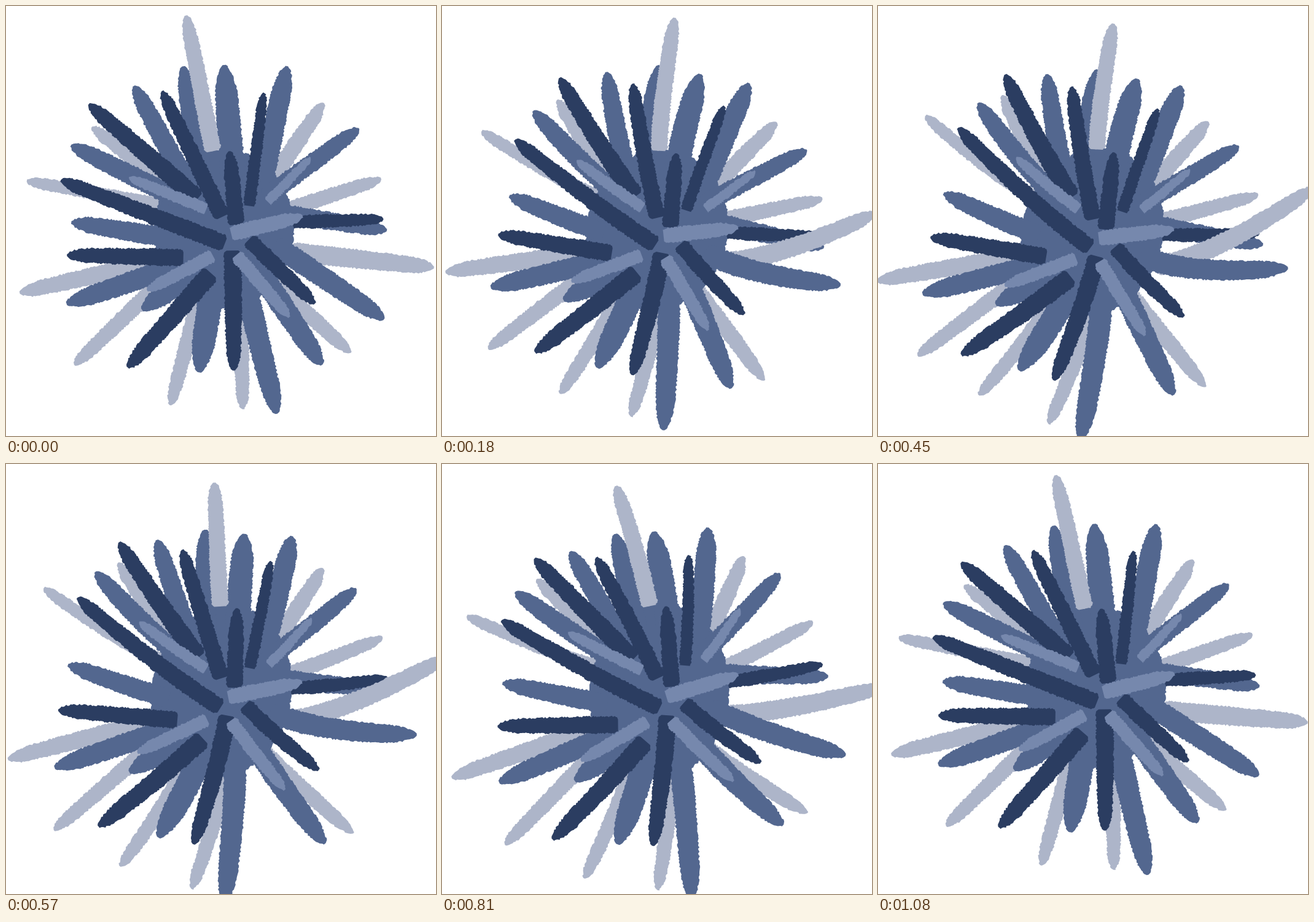
Write an HTML page with a canvas that moves like this. It is 700 px wide and 700 px high and loops after 1110 ms.

```html
<!DOCTYPE html>
<html lang="en">
<head>
<meta charset="utf-8">
<title>Swaying brush burst</title>
<style>
html, body { margin: 0; width: 100%; height: 100%; overflow: hidden; background: #fff; }
canvas { display: block; }
</style>
</head>
<body>
<canvas id="stage" width="700" height="700"></canvas>
<script>
const ctx = document.getElementById('stage').getContext('2d');
const LOOP = 1110, STEP = 30, CX = 355, CY = 365;
const LIGHT = '#adb5c9', MID = '#53678f', DARK = '#2b3d61', GLOW = '#7688ad';

// Each brush stroke: tip angle, reach, root angle, width, and root radius where it is not the layer's
const layers = [
  { color: LIGHT, root: 100, strokes: [
    [308,263,315,27], [342,269,342,24], [44,287,48,26], [84,293,75,25], [107,298,111,25],
    [138,328,142,26], [163,348,153,29], [194,331,203,22], [218,273,219,25]] },
  { color: MID, root: 90, strokes: [[0,265,341,29]] },
  { color: DARK, root: 106, strokes: [[356,260,353,21]] },
  { color: LIGHT, root: 115, strokes: [[10,347,18,31]] },
  { color: MID, body: true },
  { color: MID, root: 85, strokes: [
    [238,277,230,32], [256,275,246,34], [270,269,280,40], [291,286,313,36], [323,275,321,29],
    [29,298,16,34], [54,271,49,36], [74,311,68,36], [100,235,102,40], [136,186,125,36],
    [155,283,140,34], [183,249,171,31], [209,285,215,32]] },
  { color: LIGHT, root: 130, strokes: [[260,355,262,27]] },
  { color: DARK, root: 22, strokes: [
    [246,248,262,26], [274,129,336,26], [286,233,316,19,57], [39,190,21,25,43], [86,229,67,28,36],
    [125,273,107,30,73], [171,259,146,27,80], [197,278,87,27], [223,301,230,29,67]] },
  { color: GLOW, root: 45, strokes: [
    [350,130,27,24,13], [320,184,327,15,85], [209,177,230,18], [142,159,114,21], [53,177,64,21]] }
];

// How far tips turn by direction: degrees, radians at full swing, radians when trailing
const bends = [
  [0,.17,-.05], [10,-.42,-.25], [29,-.35,-.22], [43,.32,-.02], [54,.34,-.06], [74,.43,.2],
  [110,.41,.14], [138,.21,-.03], [163,.17,-.09], [183,.28,.02], [194,.43,.18], [223,.39,.11],
  [240,.38,.02], [270,.41,.015], [291,.29,-.04], [323,.24,-.09], [360,.17,-.05]
];

// Pose weights over time: ms, swing, trail
const poses = [[0,0,0], [180,.61,0], [300,1,0], [450,.63,.42], [690,0,1], [930,-.16,.7], [1080,-.035,.12]];

const mix = (p, q, u) => p.map((v, i) => v + (q[i] - v) * u);
const add = (p, q) => p.map((v, i) => v + q[i]);
const polar = (angle, r) => [CX + r * Math.cos(angle), CY + r * Math.sin(angle)];
const rad = degrees => degrees * Math.PI / 180;

function seeded(seed) {
  return () => (seed = (seed * 16807) % 2147483647) / 2147483647;
}

function pose(i) {
  const n = poses.length, p = poses[(i + n) % n];
  return [p[0] + LOOP * Math.floor(i / n), p[1], p[2]];
}

// Smooth cyclic curve through column c of the poses
function weight(t, c) {
  let i = poses.length - 1;
  while (poses[i][0] > t) i--;
  const span = j => pose(j + 1)[0] - pose(j)[0];
  const slope = j => (pose(j + 1)[c] - pose(j)[c]) / span(j);
  const tangent = j => (slope(j - 1) * span(j) + slope(j) * span(j - 1)) / (span(j - 1) + span(j));
  const h = span(i), u = (t - pose(i)[0]) / h, v = 1 - u;
  return (1 + 2 * u) * v * v * pose(i)[c] + u * v * v * h * tangent(i)
    + u * u * (3 - 2 * u) * pose(i + 1)[c] - u * u * v * h * tangent(i + 1);
}

// The core turns almost rigidly
function drift([x, y], a, b) {
  return [
    x - .27 * (y - 335) * a - .06 * (y - 325) * b,
    y + (.22 * (x - 350) + 2) * a + (5 + .11 * (y - 330)) * b
  ];
}

// Long tips swing by direction, short ones follow the core
function moveTip(angle, reach, a, b) {
  const i = bends.findIndex(k => k[0] > angle), p = bends[i - 1], q = bends[i];
  const [, swing, trail] = mix(p, q, (angle - p[0]) / (q[0] - p[0]));
  const s = Math.sin(rad(angle));
  const stretch = 1 + a * (.02 + .06 * s) + b * (.04 + .1 * s);
  const free = polar(rad(angle) + swing * a + trail * b, reach * stretch);
  const stiff = drift(polar(rad(angle), reach), a, b);
  return mix(stiff, free, Math.max(0, Math.min(1, (reach - 120) / 100)));
}

function fill(points, color) {
  ctx.beginPath();
  points.forEach(p => ctx.lineTo(...p));
  ctx.fillStyle = color;
  ctx.fill();
}

// Profile of a round end, 0 at the end and 1 past the cap
function cap(dist, size) {
  const c = 1 - Math.min(1, dist / size);
  return Math.sqrt(1 - c * c);
}

function brush([angle, reach, rootAngle, width, rootR], color, a, b, rnd) {
  const root = polar(rad(rootAngle), rootR), tip = polar(rad(angle), reach);
  const P = drift(root, a, b), T = moveTip(angle, reach, a, b);
  const C = mix(drift(mix(root, tip, .4), a, b), mix(P, T, .4), .5);
  const length = Math.hypot(tip[0] - root[0], tip[1] - root[1]), n = Math.round(length / 2);
  const left = [], right = [];
  for (let i = 0; i <= n; i++) {
    const s = i / n, from = mix(P, C, s), to = mix(C, T, s);
    const [x, y] = mix(from, to, s);
    const dx = to[0] - from[0], dy = to[1] - from[1], m = Math.hypot(dx, dy);
    const taper = 1 - .25 * s ** 3;
    const ends = cap((1 - s) * length, width * 1.1) * cap(s * length + 4, width * .5);
    const half = width / 2 * taper * Math.max(.15, ends);
    const edge = side => {
      const r = side * (half + 1.6 - rnd() * 2.6) / m;
      return [x - dy * r, y + dx * r];
    };
    left.push(edge(1));
    right.unshift(edge(-1));
  }
  fill(left.concat(right), color);
}

function body(color, a, b, rnd) {
  const points = [];
  for (let i = 0; i < 300; i++) {
    const angle = i / 300 * Math.PI * 2, r = 1 - rnd() * .025;
    points.push(drift([CX + 115 * r * Math.cos(angle), CY - 2 + 131 * r * Math.sin(angle)], a, b));
  }
  fill(points, color);
}

function draw() {
  const t = Math.floor(performance.now() % LOOP / STEP) * STEP;
  const a = weight(t, 1), b = weight(t, 2), rnd = seeded(4711);
  ctx.fillStyle = '#fff';
  ctx.fillRect(0, 0, 700, 700);
  for (const { color, root, strokes, body: isBody } of layers) {
    if (isBody) body(color, a, b, rnd);
    else for (const [angle, reach, rootAngle, width, rootR = root] of strokes) {
      brush([angle, reach, rootAngle, width, rootR], color, a, b, rnd);
    }
  }
  requestAnimationFrame(draw);
}
draw();
</script>
</body>
</html>
```
